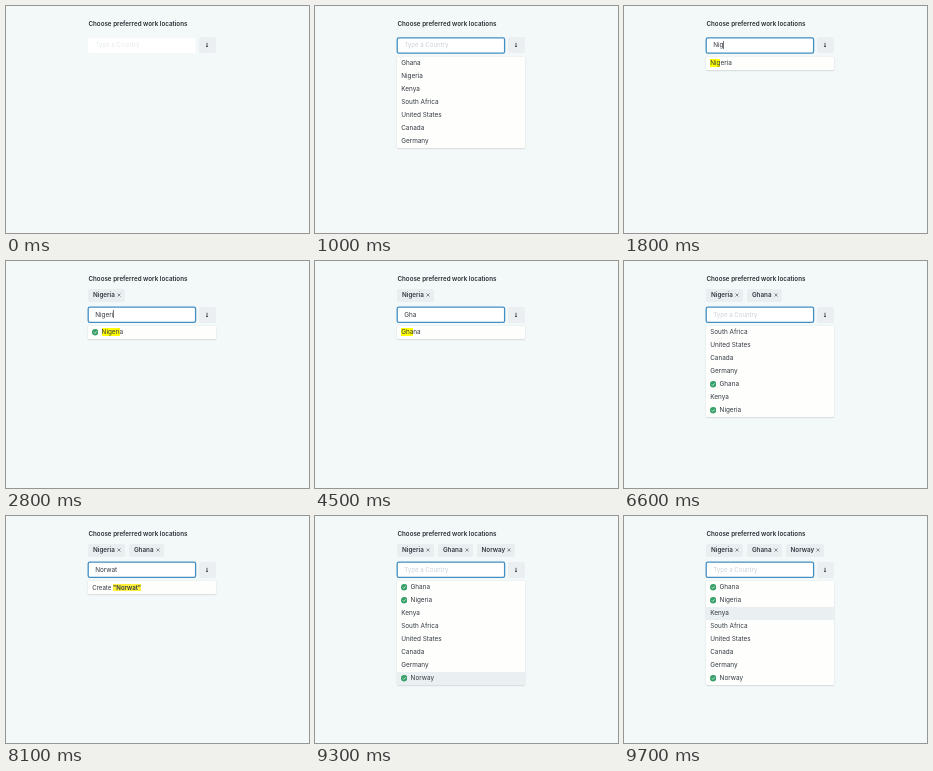
These frames come from a looping animation (303x227 px, 9.8 s). An HTML page:

```html
<!DOCTYPE html>
<html lang="en">
<head>
<meta charset="utf-8">
<title>Country picker</title>
<style>
html, body { margin: 0; width: 100%; height: 100%; overflow: hidden; background: #f3f8f8; }
body { position: relative; font: 6.4px/13px Inter, sans-serif; color: #333a41; white-space: pre; }
body > div, body > svg, .tick { position: absolute; box-sizing: border-box; }
h1 { position: absolute; left: 82.4px; top: 12px; margin: 0; font: 600 6.26px/13px Inter, sans-serif; color: #282e34; }
#chips { left: 82.4px; top: 28px; display: flex; gap: 4.4px; }
.chip { height: 13px; padding: 0 4px 0 4.6px; border-radius: 2px; background: #e9eef0; font-weight: 600; font-size: 6.3px; display: flex; align-items: center; }
.chip svg { width: 4px; height: 4px; margin: -.6px 0 0 2px; }
#stage { left: 0; top: 0; width: 100%; height: 100%; }
#field { left: 82px; width: 108px; height: 16px; padding-left: 7.2px; line-height: 16px; }
#field .hint { font-size: 6.1px; color: #cbd2d8; }
#field .selected { background: #b9d8fb; }
#field .caret { display: inline-block; width: 1px; height: 8px; background: #777; vertical-align: -1.6px; }
#button { left: 193px; width: 17px; height: 16px; border-radius: 2px; background: #ebeff1; }
#button svg { position: absolute; left: 5px; top: 5.2px; width: 6px; height: 6px; }
#list { left: 82.4px; width: 127.4px; background: #fefefd; box-shadow: 0 .5px 1.5px #0003; border-radius: 1px; }
.row { position: relative; height: 13px; padding-left: 3.8px; }
.row.checked { padding-left: 13.2px; }
.row.hover { background: #eaeff1; }
.row.create { font-size: 6.1px; }
.tick { left: 3.4px; top: 3.6px; width: 6.4px; height: 6.4px; }
mark { background: #ff0; color: inherit; }
.create mark { background: #fdf03c; font-weight: 600; }
</style>
</head>
<body>
<h1>Choose preferred work locations</h1>
<div id="chips"></div>
<svg id="stage"><rect id="frame" x="82.2" width="107.4" height="15.2" rx="1.6" fill="#fff" stroke="#438fc4" stroke-width="1.3"/></svg>
<div id="field"></div>
<div id="button"><svg viewBox="0 0 6 6" fill="none" stroke="#30363c" stroke-width=".8"><path d="M3 .8V5M2 4L3 5 4 4"/></svg></div>
<div id="list"></div>
<script>
const LOOP = 9800;
const initial = ['Ghana', 'Nigeria', 'Kenya', 'South Africa', 'United States', 'Canada', 'Germany'];
const sorted = ['South Africa', 'United States', 'Canada', 'Germany', 'Ghana', 'Kenya', 'Nigeria'];
const cross = '<svg viewBox="0 0 4 4" stroke="#59616a" stroke-width=".7"><path d="M.5 .5l3 3M3.5 .5l-3 3"/></svg>';
const tick = '<svg class="tick" viewBox="0 0 12 12"><circle cx="6" cy="6" r="6" fill="#38a169"/><path d="M3.3 6.2l2 2 3.5-4" fill="none" stroke="#fff" stroke-width="1.2"/></svg>';

// [time, typed text]
const typing = [
  [0, ''], [1600, 'N'], [1700, 'Ni'], [1800, 'Nig'], [1900, 'Nige'], [2400, 'Niger'], [2500, 'Nigeri'],
  [3900, 'G'], [4000, 'Gh'], [4100, 'Gha'], [5700, 'Gh'], [5800, 'G'], [5900, ''],
  [6900, 'N'], [7000, 'No'], [7100, 'Nor'], [7200, 'Norw'], [7300, 'Norwa'], [7500, 'Norwat'],
  [8200, 'Norwa'], [8300, 'Norway'], [8800, '']
];
const picks = [[2700, 'Nigeria'], [4900, 'Ghana'], [8800, 'Norway']];
// [time, hovered row]
const hovers = [
  [0, -1], [2500, 0], [2700, -1], [4600, 0], [4900, -1], [8300, 0], [8800, -1],
  [9300, 7], [9400, 4], [9500, 3], [9700, 2]
];

const el = id => document.getElementById(id);
const at = (steps, t) => steps.findLast(s => s[0] <= t);

function options(text, t) {
  if (t >= 8800) return [...initial, 'Norway'];
  if (!text) return t < 1600 ? initial : sorted;
  const key = text.toLowerCase();
  const rank = name => name.toLowerCase().startsWith(key) ? 0 : 1;
  return initial.filter(name => name.toLowerCase().includes(key))
    .sort((a, b) => rank(a) - rank(b) || a.localeCompare(b));
}

function highlight(name, text) {
  return text ? name.replace(new RegExp(text, 'gi'), '<mark>$&</mark>') : name;
}

function row(html, hovered, kind) {
  return `<div class="row ${kind}${hovered ? ' hover' : ''}">${kind === 'checked' ? tick : ''}${html}</div>`;
}

function put(id, html) {
  const node = el(id);
  if (node.last !== html) node.innerHTML = node.last = html;
}

function render(t) {
  const [typedAt, text] = at(typing, t);
  const hovered = at(hovers, t)[1];
  const chosen = picks.filter(p => p[0] <= t).map(p => p[1]);
  const top = chosen.length ? 45.5 : 31.3;
  const selected = t >= 3500 && t < 3900;
  const caret = text && t - typedAt < 380 ? '<span class="caret"></span>' : '';

  put('chips', chosen.map(name => `<div class="chip">${name}${cross}</div>`).join(''));
  put('field', text
    ? `<span class="${selected ? 'selected' : ''}">${text}</span>${caret}`
    : `<span class="hint" style="opacity:${t < 400 ? .5 : 1}">Type a Country</span>`);
  el('field').style.top = el('button').style.top = top + 'px';
  el('frame').setAttribute('y', top + .6);
  el('frame').setAttribute('stroke-opacity', t < 800 ? 0 : Math.min(1, (t - 700) / 200));

  const names = options(text, t);
  const rows = names.length
    ? names.map((name, i) => row(highlight(name, text), i === hovered, chosen.includes(name) ? 'checked' : ''))
    : [row(`Create <mark>"${text}"</mark>`, hovered === 0, 'create')];
  put('list', t < 800 ? '' : rows.join(''));
  el('list').style.top = top + 19.4 + 'px';
}

const start = performance.now();
(function animate() {
  render((performance.now() - start) % LOOP);
  requestAnimationFrame(animate);
})();
</script>
</body>
</html>
```
